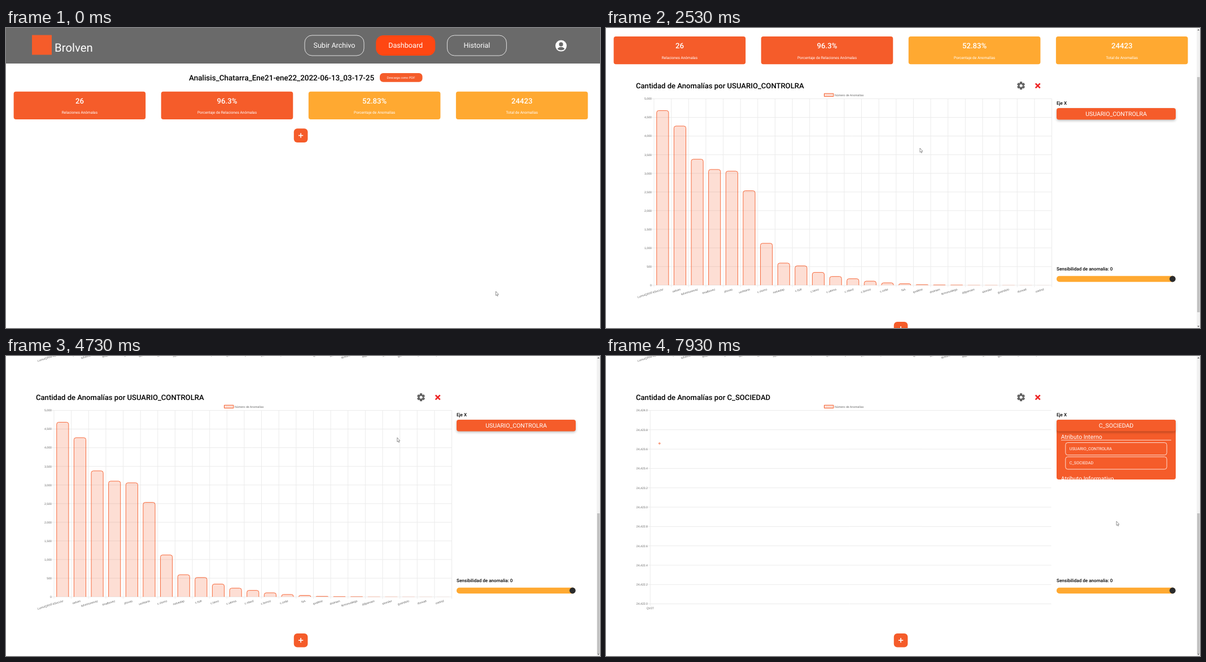
An HTML page with a canvas for the animation above (8000 ms loop, 1052x532 px).

```html
<!DOCTYPE html>
<html lang="es">
<head>
<meta charset="utf-8">
<title>Dashboard</title>
<style>
html, body { margin: 0; width: 100%; height: 100%; overflow: hidden; background: #fff; }
canvas { display: block; width: 1052px; height: 532px; }
</style>
</head>
<body>
<canvas id="stage"></canvas>
<script>
const W = 1052, H = 532, LOOP = 8000;
const ORANGE = '#f55c2a', AMBER = '#ffa931', GREY = '#6a6a6a', GRID = '#ebebeb', TINT = 'rgba(245,92,42,.2)';
const canvas = document.getElementById('stage'), ctx = canvas.getContext('2d');
const dpr = window.devicePixelRatio || 1;
canvas.width = W * dpr;
canvas.height = H * dpr;

// Chart geometry, in page coordinates of the first chart
const LEFT = 85, RIGHT = 789.5, TOP = 222.5, BASE = 553.1, CHART_GAP = 439.6;
const users = ('LumviQRXF4SvcUsr oelvim kdvortunevaz tmalbuvez pluvas uorbiana c.vlumo nolvedap c.fsilt c.tarvo ' +
  'c.ulema c.nlavd c.brince c.zolte NA qvaltine drelnam tkmonvalega ddparvam slomiler gvandolo ifonvalt oselnd').split(' ');
const counts = [4690, 4275, 3385, 3110, 3065, 2540, 1130, 600, 525, 350, 240, 180, 115, 70, 45, 20, 12, 10, 5, 4, 3, 2, 1];
const CATEGORY = (RIGHT - LEFT) / users.length;

// The empty chart has five slots and a narrower axis
const START_LEFT = 69, START_CATEGORY = (RIGHT - START_LEFT) / 5;

// Moments of the interaction (ms)
const ADD_FIRST = 1070, ADD_SECOND = 3390, MENU_OPEN = 5110, TO_AREA = 6050, PANEL_OPEN = 6650, PICK = 7530, REPLOT = 7861;

const scrollKeys = [[1580, 0], [1870, 81], [2070, 84], [2500, 84], [2530, 97], [2720, 126], [3700, 126], [4400, 565.6]];
const cursorKeys = [
  [40, 867.5, 467], [730, 526, 197], [1300, 526, 197], [1530, 540, 202], [1870, 556, 213], [2530, 556, 213],
  [3200, 525, 500], [3360, 525, 500], [3600, 572, 326], [4130, 594, 316], [4300, 594, 316], [4980, 736, 70],
  [5250, 736, 70], [5790, 726.5, 116], [6120, 726.5, 116], [6620, 905, 122], [6720, 905, 122], [7000, 905, 188],
  [7560, 905, 188], [7900, 904, 293]
];

const clamp = v => Math.max(0, Math.min(1, v));
const growth = (t, start) => 1 - (1 - clamp((t - start) / 1000)) ** 4;
const mix = (a, b, u) => a + (b - a) * u;

function at(keys, t) {
  let i = keys.findIndex(k => k[0] > t);
  if (i < 0) i = keys.length;
  const a = keys[Math.max(0, i - 1)], b = keys[Math.min(i, keys.length - 1)];
  const u = a === b ? 0 : clamp((t - a[0]) / (b[0] - a[0])), s = u * u * (3 - 2 * u);
  return a.slice(1).map((v, j) => mix(v, b[j + 1], s));
}

// y is the middle of the capitals
function text(str, x, y, size, { color = '#000', weight = 400, align = 'left', family = 'Roboto' } = {}) {
  ctx.font = `${weight} ${size}px "${family}", sans-serif`;
  ctx.textAlign = align;
  ctx.fillStyle = color;
  ctx.fillText(str, x, y + size * 0.355);
}
const label = (str, x, y, align = 'right') => text(str, x, y, 5.2, { color: '#666', align, family: 'Liberation Sans' });

function box(x, y, w, h, r, fill, stroke, lineWidth = 0.8) {
  ctx.beginPath();
  ctx.roundRect(x, y, w, h, r);
  if (fill) { ctx.fillStyle = fill; ctx.fill(); }
  if (stroke) { ctx.strokeStyle = stroke; ctx.lineWidth = lineWidth; ctx.stroke(); }
}

function line(x1, y1, x2, y2, color = GRID, width = 1) {
  ctx.beginPath();
  ctx.moveTo(x1, y1);
  ctx.lineTo(x2, y2);
  ctx.strokeStyle = color;
  ctx.lineWidth = width;
  ctx.stroke();
}

function disc(x, y, r, fill) {
  ctx.beginPath();
  ctx.arc(x, y, r, 0, 7);
  ctx.fillStyle = fill;
  ctx.fill();
}

function withShadow(blur, dy, draw) {
  ctx.save();
  ctx.shadowColor = 'rgba(0,0,0,.25)';
  ctx.shadowBlur = blur * dpr;
  ctx.shadowOffsetY = dy * dpr;
  draw();
  ctx.restore();
}

function header(narrow) {
  const dx = narrow ? -3.2 : 0, dy = narrow ? -0.4 : 0;
  ctx.fillStyle = GREY;
  ctx.fillRect(0, 0, W, 63 + dy);
  ctx.fillStyle = ORANGE;
  ctx.fillRect(46, 12.5, 35, 35);
  text('Brolven', 86, 34.5, 20.4, { color: '#fff' });
  ['Subir Archivo', 'Dashboard', 'Historial'].forEach((name, i) => {
    const x = 529 + 126.2 * i + dx, active = i === 1;
    box(x, 13 + dy, 105, 36, 13, active && '#ff4713', !active && '#fff');
    text(name, x + 52.5, 31 + dy, 12.6, { color: '#fff', align: 'center' });
  });
  const ax = 983 + dx * 2, ay = 31.6;
  disc(ax, ay, 10, '#fff');
  disc(ax, ay - 2.7, 3.6, GREY);
  ctx.beginPath();
  ctx.ellipse(ax, ay + 6, 6.2, 3.8, 0, Math.PI, 0);
  ctx.quadraticCurveTo(ax, ay + 10, ax - 6.2, ay + 6);
  ctx.fill();
  text('Analisis_Chatarra_Ene21-ene22_2022-06-13_03-17-25', 324 + dx, 88 + dy, 13.48, { weight: 500 });
  box(662 + dx, 80 + dy, 75.5, 15.8, 6, ORANGE);
  text('Descarga como PDF', 699.5 + dx, 88 + dy, 5.4, { color: '#fff', align: 'center', family: 'Liberation Sans' });
}

function cards(narrow) {
  const y = narrow ? 112.1 : 112.7;
  [['26', 'Relaciones Anómalas'], ['96.3%', 'Porcentaje de Relaciones Anómalas'],
   ['52.83%', 'Porcentaje de Anomalías'], ['24423', 'Total de Anomalías']].forEach(([value, name], i) => {
    const x = 13.6 + 261.1 * i;
    box(x, y, 233.6, 49.2, 4, i < 2 ? ORANGE : AMBER);
    text(value, x + 116.8, y + 16.5, 13.2, { color: '#fff', weight: 500, align: 'center' });
    text(name, x + 116.8, y + 37.2, 6.58, { color: '#fff', align: 'center' });
  });
}

function addButton(y) {
  box(509.8, y - 12.3, 24.6, 24.6, 6, ORANGE);
  line(518, y, 526.2, y, '#fff', 1.6);
  line(522.1, y - 4.1, 522.1, y + 4.1, '#fff', 1.6);
}

function gear(x, y) {
  ctx.save();
  ctx.translate(x, y);
  ctx.fillStyle = '#636363';
  for (let i = 0; i < 6; i++) {
    ctx.rotate(Math.PI / 3);
    ctx.fillRect(-2.1, -7, 4.2, 4);
  }
  ctx.beginPath();
  ctx.arc(0, 0, 5.4, 0, 7);
  ctx.arc(0, 0, 2.5, 0, 7, true);
  ctx.fill('evenodd');
  ctx.restore();
}

function userAxes() {
  for (let i = 0; i <= 10; i++) {
    const y = mix(BASE, TOP, i / 10);
    line(LEFT - 3.5, y, RIGHT, y);
    label((i * 500).toLocaleString('en-US'), LEFT - 4, y);
  }
  for (let i = 0; i <= users.length; i++) line(LEFT + i * CATEGORY, TOP, LEFT + i * CATEGORY, BASE + 3.5);
  users.forEach((user, i) => {
    ctx.save();
    ctx.translate(LEFT + (i + 0.5) * CATEGORY + 1, BASE + 7);
    ctx.rotate(-0.3);
    label(user, 0, 0);
    ctx.restore();
  });
}

// Bar open at the bottom, with its border inside
function bar(x, y, width) {
  const border = Math.min(0.9, BASE - y), half = (width - border) / 2, top = y + border / 2;
  const r = Math.min(3.6, BASE - top);
  ctx.beginPath();
  ctx.moveTo(x - half, BASE);
  ctx.arcTo(x - half, top, x, top, r);
  ctx.arcTo(x + half, top, x + half, BASE, r);
  ctx.lineTo(x + half, BASE);
  ctx.fill();
  if (border <= 0) return;
  ctx.lineWidth = border;
  ctx.stroke();
}

// The categories start as wide slots and shrink into place.
function userSeries(e, area) {
  const step = mix(START_CATEGORY, CATEGORY, e), left = mix(START_LEFT, LEFT, e);
  const points = counts.map((n, i) => [left + step * (i + 0.5), BASE - n * e * (BASE - TOP) / 5000]);
  ctx.save();
  ctx.beginPath();
  ctx.rect(LEFT, TOP - 2, RIGHT - LEFT, BASE - TOP + 4);
  ctx.clip();
  ctx.fillStyle = TINT;
  ctx.strokeStyle = ORANGE;
  ctx.lineWidth = 1;
  if (area) {
    const trace = () => points.forEach(p => ctx.lineTo(...p));
    ctx.beginPath();
    trace();
    ctx.lineTo(points.at(-1)[0], BASE);
    ctx.lineTo(points[0][0], BASE);
    ctx.fill();
    ctx.beginPath();
    trace();
    ctx.stroke();
    points.forEach(p => marker(...p));
  } else points.forEach(([x, y]) => bar(x, y, step * 0.72));
  ctx.restore();
}

function marker(x, y) {
  ctx.beginPath();
  ctx.arc(x, y, 1.3, 0, 7);
  ctx.fillStyle = TINT;
  ctx.fill();
  ctx.strokeStyle = ORANGE;
  ctx.lineWidth = 0.8;
  ctx.stroke();
}

function companyPlot(t) {
  const left = 78.3, base = 565.6, e = growth(t, REPLOT);
  for (let i = 0; i <= 10; i++) {
    const y = mix(base, TOP, i / 10);
    line(left - 3.5, y, 788.5, y);
    label((24422 + i / 5).toLocaleString('en-US', { minimumFractionDigits: 1 }), left - 4.3, y);
  }
  line(left, TOP, left, base + 3.5);
  label('QV27', left, base + 7.5, 'center');
  const fromY = BASE - counts[0] * (BASE - TOP) / 5000;
  marker(mix(LEFT + CATEGORY / 2, left, e), mix(fromY, (TOP + base) / 2, e));
}

function sidebar(field, open) {
  text('Eje X', 798, 230, 8.1, { weight: 500 });
  if (open) box(798, 239, 211, 106, 4, ORANGE);
  withShadow(4, 2, () => box(798, 239, 211, 20.4, 4, ORANGE));
  text(field, 903.5, 249.2, 10.55, { color: '#fff', align: 'center' });
  if (open) {
    ctx.save();
    ctx.beginPath();
    ctx.rect(798, 239, 211, 106);
    ctx.clip();
    text('Atributo Interno', 805.8, 268.8, 10.5, { color: '#fff' });
    line(806, 275.2, 1001, 275.2, '#fff', 0.8);
    ['USUARIO_CONTROLRA', 'C_SOCIEDAD'].forEach((name, i) => {
      const y = 279.6 + 25.2 * i;
      box(813.8, y, 179.4, 22, 4, null, '#fff');
      text(name, 820.8, y + 11, 7.3, { color: '#fff' });
    });
    text('Atributo Informativo', 805.8, 343.5, 10.5, { color: '#fff' });
    ctx.restore();
  }
  text('Sensibilidad de anomalia: 0', 798, 524.3, 8.1, { weight: 500 });
  box(798, 536.8, 210, 10.4, 5, AMBER);
  disc(1003.4, 542, 5.4, '#2b2b2b');
}

function typeMenu(pointerY) {
  withShadow(8, 3, () => box(677, 210, 116, 63.4, 4, '#fff'));
  ['Barras', 'Area', 'Burbuja'].forEach((kind, i) => {
    const y = 210 + 21.1 * i;
    if (pointerY >= y && pointerY < y + 21.1) box(677, y, 116, 21.1, 0, '#dcdcdc');
    text('Grafico de ' + kind, 682, y + 10.5, 10.45);
  });
}

function chart(index, t, pointerY) {
  const second = index === 1, offset = CHART_GAP * index;
  const field = second && t >= PICK ? 'C_SOCIEDAD' : 'USUARIO_CONTROLRA';
  ctx.save();
  ctx.translate(0, offset);
  text('Cantidad de Anomalías por ' + field, 53, 199.2, 13.08, { weight: 500 });
  gear(735, 199.2);
  line(760.7, 195.3, 768.7, 203.3, '#ee2424', 2.6);
  line(768.7, 195.3, 760.7, 203.3, '#ee2424', 2.6);
  box(386.5, 213.2, 16.4, 5.2, 0, TINT, ORANGE, 1);
  label('Número de Anomalías', 405, 215.8, 'left');
  if (second && t >= REPLOT) companyPlot(t);
  else {
    const area = second && t >= TO_AREA;
    userAxes();
    userSeries(growth(t, area ? TO_AREA : second ? 3442 : 1090), area);
  }
  sidebar(field, second && t >= PANEL_OPEN);
  if (second && t >= MENU_OPEN && t < TO_AREA) typeMenu(pointerY - offset);
  ctx.restore();
}

function scrollbar(scroll, chartCount) {
  const thumb = chartCount === 1 ? 417 : 249, max = chartCount === 1 ? 126 : 565.6;
  ctx.fillStyle = '#f1f1f1';
  ctx.fillRect(1046.3, 0, 5.7, H);
  ctx.fillStyle = '#c1c1c1';
  ctx.fillRect(1046.9, 7 + (521 - thumb) * scroll / max, 4.6, thumb);
  ctx.fillStyle = '#555';
  for (const [tip, foot] of [[2, 4.2], [530.4, 528.2]]) {
    ctx.beginPath();
    ctx.moveTo(1049.2, tip);
    ctx.lineTo(1051, foot);
    ctx.lineTo(1047.4, foot);
    ctx.fill();
  }
}

function pointer(x, y) {
  ctx.beginPath();
  [[0, 0], [0, 7.4], [1.6, 6], [2.7, 8.5], [3.8, 8], [2.8, 5.6], [4.9, 5.4]].forEach(([a, b]) => ctx.lineTo(x + a, y + b));
  ctx.closePath();
  ctx.fillStyle = '#fff';
  ctx.fill();
  ctx.strokeStyle = '#666';
  ctx.lineWidth = 0.7;
  ctx.stroke();
}

function draw(t) {
  const chartCount = (t >= ADD_FIRST) + (t >= ADD_SECOND), narrow = chartCount > 0;
  const [scroll] = at(scrollKeys, t), [px, py] = at(cursorKeys, t);
  ctx.setTransform(dpr, 0, 0, dpr, 0, 0);
  ctx.textRendering = 'geometricPrecision';
  ctx.fillStyle = '#fff';
  ctx.fillRect(0, 0, W, H);
  ctx.save();
  ctx.translate(0, -scroll);
  header(narrow);
  cards(narrow);
  for (let i = 0; i < chartCount; i++) chart(i, t, py + scroll);
  addButton(190.6 + CHART_GAP * chartCount);
  ctx.restore();
  if (narrow) scrollbar(scroll, chartCount);
  pointer(px, py);
}

const start = performance.now();
function tick() {
  draw((performance.now() - start) % LOOP);
  requestAnimationFrame(tick);
}
tick();
</script>
</body>
</html>
```
